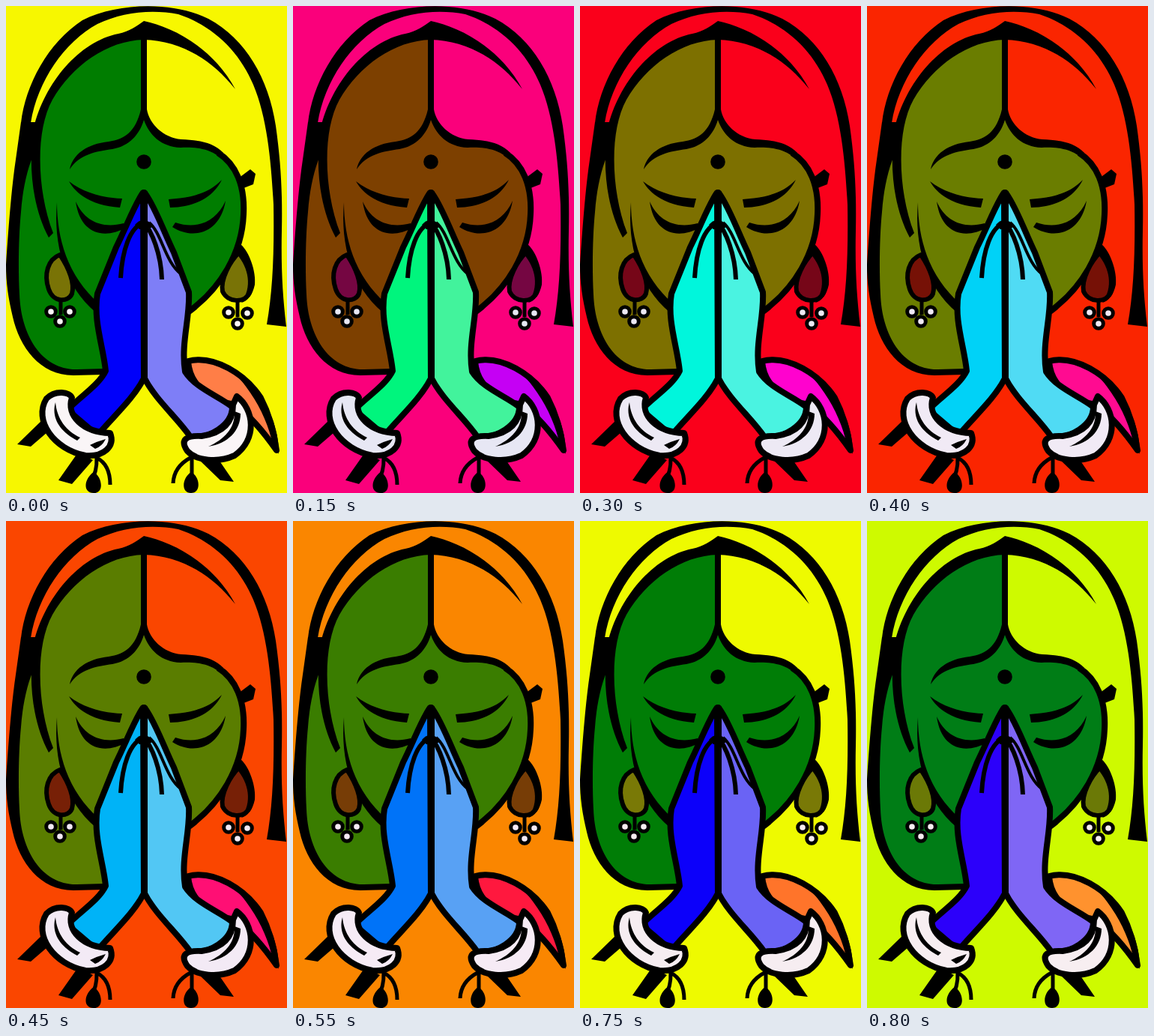
These frames come from a looping animation (375 px wide and 650 px high, 0.85 s). An HTML page:

```html
<!DOCTYPE html>
<html lang="en">
<head>
<meta charset="utf-8">
<title>Namaste</title>
<style>
  html, body { margin: 0; width: 100%; height: 100%; overflow: hidden; }
  svg { display: block; width: 375px; height: 650px; }
  .line { fill: none; stroke: #000; stroke-width: 8; stroke-linejoin: round; }
  .edge { stroke: #000; stroke-width: 8; stroke-linejoin: round; }
  .thin { stroke-width: 6; }
</style>
</head>
<body>
<svg viewBox="0 0 375 650">
  <rect class="bg" width="375" height="650"/>

  <!-- hair and face -->
  <path class="skin" d="M184 34C130 38 58 88 42 160L28 200C14 260 8 340 14 390C20 440 46 489 95 489H128L184 450L246 407C285 375 313 340 319 288C321 235 295 186 250 184C215 184 190 166 184 140Z"/>

  <!-- shawl -->
  <path class="shawl edge" d="M243 474C278 465 320 492 340 523C352 546 358 570 361 593C345 570 328 549 306 532C286 530 246 515 243 474Z"/>
  <path d="M300 485C337 505 365 552 364 598L354 577C346 545 326 510 300 485Z"/>

  <!-- veil -->
  <path d="M20 156C26 105 56 49 102 19C150 -5 224 -6 270 17C320 44 350 96 360 160C367 210 369 250 368 300C367 350 369 385 374 428L348 425C356 380 358 330 357 265C354 210 349 150 330 105C312 62 278 27 230 11C195 4 155 8 122 24C78 48 42 100 33 156Z"/>
  <path d="M20 155H43L38 196C29 214 22 245 20 275C17 305 16 350 18 385C20 440 48 486 95 485L130 484V492L90 493C45 493 18 455 9 415C3 390 0 370 0 345C3 300 7 245 13 205Z"/>

  <!-- hair lines -->
  <path d="M184 20C222 28 276 55 306 111C273 69 230 46 184 45C135 46 88 80 62 125C38 168 42 250 63 303L57 309C36 270 29 215 37 163C51 103 98 47 150 37C164 34 176 26 184 20Z"/>
  <path class="line" d="M184 36V148"/>
  <path d="M180 138C173 168 158 178 137 181C108 184 89 198 85 218C98 198 120 194 142 191C164 187 178 172 184 152C191 172 207 188 233 189C255 188 270 191 283 200L290 196C276 181 255 179 234 178C210 176 191 157 188 138Z"/>
  <path class="line" d="M283 196C307 211 319 240 317 278C315 330 286 377 244 408"/>
  <path d="M310 230L326 218L333 224L330 238L317 243Z"/>
  <path d="M68 262C68 310 82 360 124 397L120 409C78 374 63 318 68 262Z"/>

  <!-- features -->
  <circle cx="184" cy="208" r="9.8"/>
  <path d="M84 234C105 250 130 256 155 257L152 269C120 267 96 255 84 234Z"/>
  <path d="M288 232C270 251 245 256 217 258L219 269C252 268 276 256 288 232Z"/>
  <path d="M93 261C104 286 127 298 157 290L160 296C130 312 99 304 93 261Z"/>
  <path d="M293 260C281 287 256 299 226 289L222 295C250 313 286 303 293 260Z"/>

  <!-- earrings -->
  <path class="ear edge thin" d="M72 332C56 338 50 358 57 378C63 396 83 396 88 384C92 370 84 350 72 332Z"/>
  <path class="ear edge thin" d="M312 328C298 342 286 365 289 381C296 396 318 397 325 383C331 366 326 345 312 328Z"/>
  <path d="M313 318C325 328 334 355 332 372C329 386 322 394 314 396C329 375 324 350 308 331Z"/>
  <path class="line" style="stroke-width:5" d="M73 393V412M309 393V415"/>
  <g class="white" id="beads" stroke="#000" stroke-width="5"></g>

  <!-- straps and tassels -->
  <path d="M50 551L62 563L33 588L15 585ZM96 596L116 606L88 638L70 633ZM258 606L280 600L304 635L286 633Z"/>
  <path class="line" style="stroke-width:5" d="M120 596Q123 612 117 628M121 603Q139 612 139 639M248 598V628M246 603Q224 615 223 637"/>
  <path d="M117 622C128 628 132 650 117 650S104 631 117 622ZM247 622C259 628 261 650 247 650S235 630 247 622Z"/>

  <!-- arms and hands -->
  <path class="blue edge" d="M183 249C173 262 160 296 147 322L122 384C116 420 130 455 133 487C124 506 98 522 82 539L122 573C145 546 170 524 184 497Z"/>
  <path class="pale edge" d="M185 249C199 268 210 300 224 329L244 382C246 415 233 450 239 488C253 510 283 520 302 535C302 560 270 578 246 575C228 549 200 526 185 497Z"/>
  <path class="line" d="M184.500 247V500"/>
  <path class="line thin" d="M184 289C165 295 155 327 153 363M184 289C194 300 207 330 208 365"/>
  <path class="line" style="stroke-width:4" d="M191 289C208 303 212 342 234 358"/>
  <path d="M172 292Q184 278 197 294L190 298H178Z"/>

  <!-- bangles -->
  <path class="white edge" d="M54 524C66 512 85 515 88 523C80 546 102 569 139 570C146 588 130 602 106 600C64 592 36 553 54 524Z"/>
  <path class="white edge" d="M308 521C331 538 336 578 305 600C283 610 254 607 242 594C231 578 242 573 261 574C289 570 303 556 303 532Z"/>
  <path d="M66 529C68 551 80 567 99 576L95 580C72 568 60 550 66 529ZM112 586Q122 581 133 578Q128 588 119 591ZM313 544C313 567 296 584 270 588C292 578 306 563 305 541Z"/>
</svg>
<script>
const STEP = 50, COUNT = 17;

const beads = [[60, 408], [85, 408], [72, 421], [297, 409], [322, 410], [309, 424]];
document.getElementById('beads').innerHTML =
  beads.map(([x, y]) => `<circle cx="${x}" cy="${y}" r="6.3"/>`).join('');

// hue, saturation, lightness at rest; lightness at the start and end of the sweep
const paints = {
  bg:    [60, 100, 48.5, 49, 49],
  skin:  [120, 100, 24.5, 24.5, 24.5],
  blue:  [240, 100, 49, 48, 49],
  pale:  [240, 88, 73, 60, 68],
  ear:   [57, 90, 25, 24, 25],
  shawl: [18, 100, 64, 47, 59],
  white: [330, 35, 97, 93, 95]
};

function colour([hue, sat, rest, from, to], i) {
  if (i < 2) return `hsl(${hue}, ${sat}%, ${rest}%)`;
  const turn = -89.5 + 7.7 * (i - 3);
  const light = from + (to - from) * (i - 2) / (COUNT - 3);
  return `hsl(${(hue + turn + 360) % 360}, ${sat}%, ${light}%)`;
}

for (const [name, paint] of Object.entries(paints)) {
  const frames = Array.from({ length: COUNT + 1 }, (_, i) => ({
    offset: i / COUNT,
    fill: colour(paint, Math.min(i, COUNT - 1)),
    easing: 'steps(1, end)'
  }));
  for (const el of document.querySelectorAll('.' + name)) {
    el.animate(frames, { duration: STEP * COUNT, iterations: Infinity });
  }
}
</script>
</body>
</html>
```
